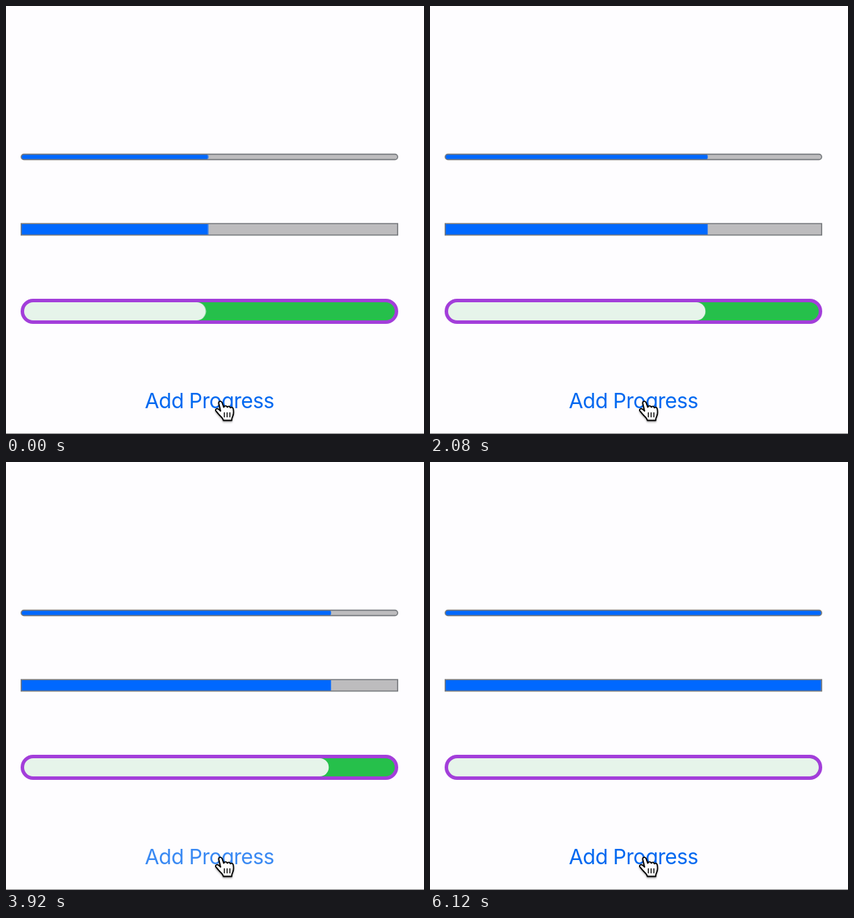
These frames come from a looping animation (600 by 614 pixels, 6.16 s). An HTML page:

```html
<!DOCTYPE html>
<html lang="en">
<head>
<meta charset="utf-8">
<title>Progress bars</title>
<style>
  html, body { margin: 0; width: 100%; height: 100%; overflow: hidden; background: #fefdff; }
  svg { display: block; }

  .fill { animation: grow 6160ms ease-in-out infinite; }
  .label {
    font: 30px Inter, "Liberation Sans", sans-serif;
    letter-spacing: -.018em;
    fill: #0068f0;
    animation: press 6160ms linear infinite;
  }
  .frame { fill: none; stroke: #777a7e; stroke-width: 1.6; }

  /* each tap adds a tenth, 54.3px, over 350ms */
  @keyframes grow {
    0%, 1.461% { transform: translateX(-271.5px); }
    7.143%, 22.24% { transform: translateX(-217.2px); }
    27.922%, 41.997% { transform: translateX(-162.9px); }
    47.679%, 61.688% { transform: translateX(-108.6px); }
    67.37%, 81.656% { transform: translateX(-54.3px); }
    87.338%, 100% { transform: translateX(0); }
  }

  /* dims at once on press, fades back after release */
  @keyframes press {
    0%, 4.302%, 25.081%, 44.838%, 64.529%, 84.497%, 100% {
      opacity: 1;
      animation-timing-function: step-end;
    }
    .162%, 1.461%, 20.942%, 22.24%, 40.698%, 41.997%, 60.39%, 61.688%, 80.357%, 81.656% {
      opacity: .28;
    }
  }
</style>
</head>
<body>
<svg width="600" height="614" viewBox="0 0 600 614">
  <defs>
    <clipPath id="thin"><rect x="22" y="212.5" width="540" height="8" rx="4"/></clipPath>
    <clipPath id="square"><rect x="22" y="312" width="540" height="17"/></clipPath>
    <clipPath id="pill"><rect x="25.5" y="424.5" width="533" height="27" rx="13.5"/></clipPath>
    <filter id="shadow" x="-30%" y="-30%" width="160%" height="170%">
      <feDropShadow dx="0" dy="1.5" stdDeviation="1.2" flood-opacity=".35"/>
    </filter>
  </defs>

  <g clip-path="url(#thin)">
    <rect x="22" y="212" width="541" height="9" fill="#bdbcbe"/>
    <rect class="fill" x="-300" y="212.5" width="861.5" height="8" rx="3" fill="#0068ff"/>
  </g>
  <rect class="frame" x="21.8" y="212.6" width="540.4" height="7.8" rx="3.9"/>

  <g clip-path="url(#square)">
    <rect x="22" y="312" width="541" height="17" fill="#bdbcbe"/>
    <rect class="fill" x="-300" y="312" width="861.5" height="17" fill="#0068ff"/>
  </g>
  <rect class="frame" x="21.8" y="312.2" width="540.4" height="16.4"/>

  <g clip-path="url(#pill)">
    <rect x="25" y="424" width="534" height="28" fill="#26c04b"/>
    <rect class="fill" x="-300" y="425" width="858.3" height="26" rx="13" fill="#e6f4ea"/>
  </g>
  <rect x="23.5" y="422.5" width="537" height="31" rx="15.5" fill="none" stroke="#a33eda" stroke-width="5"/>

  <text class="label" x="292" y="577" text-anchor="middle">Add Progress</text>

  <g filter="url(#shadow)" stroke="#000" stroke-linecap="round" stroke-linejoin="round">
    <path fill="#fff" stroke-width="1.8" d="M305.5 570.5C304.5 567 309 565.8 310.2 569L312.6 575.6
      C313.4 573.2 317 573 317.6 575.6C318.6 573.8 321.6 574 322 576.4C323.4 575 326 575.8 326.2 578.2
      C326.8 582 327 585 325.6 588C324.6 590 324 591.5 324 594.5L312 594.5C311.6 592 309.5 589.8 307.5 588
      C305.2 585.8 303 583 301.4 581C299.8 578.6 302.8 576.6 305 578.4L308 581Z"/>
    <path fill="none" stroke-width="1.4" d="M313.4 583.5v6M317.4 583.5v6M321.4 583.5v6"/>
  </g>

  <rect y="613" width="600" height="1" fill="#858487"/>
</svg>
</body>
</html>
```
